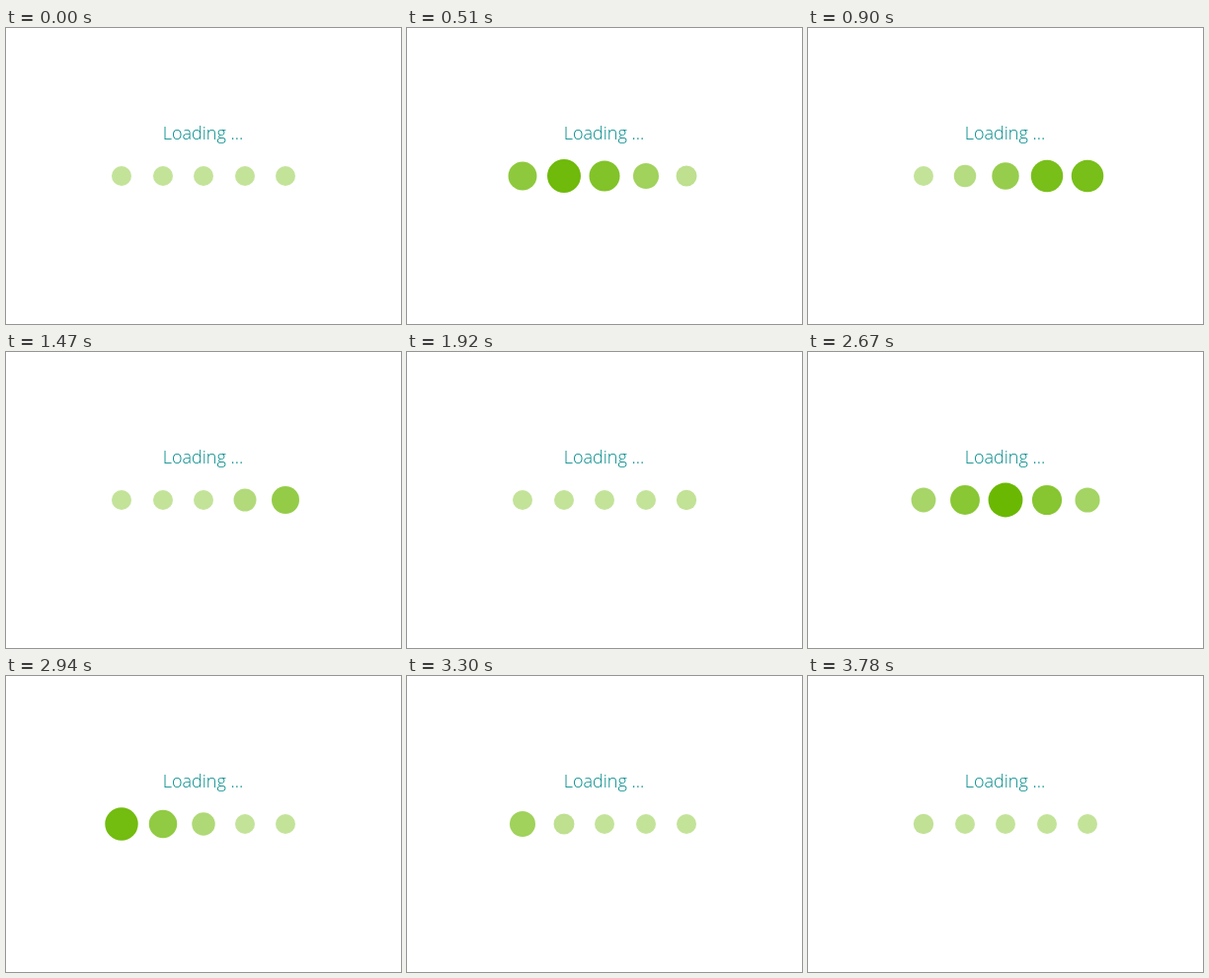
These frames come from a looping animation (400 by 300 pixels, 3.81 s). An HTML page:

```html
<!DOCTYPE html>
<html lang="en">
<head>
<meta charset="utf-8">
<title>Loading</title>
<style>
  /* Position of the wave, counted in dots */
  @property --wave {
    syntax: "<number>";
    inherits: true;
    initial-value: -2;
  }
  html, body {
    margin: 0;
    width: 100%;
    height: 100%;
    overflow: hidden;
    background: #fff;
  }
  svg {
    display: block;
    width: 400px;
    height: 300px;
    animation: sweep 3810ms linear infinite;
  }
  text {
    font: 300 18px "Open Sans", sans-serif;
    fill: #008b8b;
    text-anchor: middle;
  }
  circle {
    --gap: max(var(--wave) - var(--i), var(--i) - var(--wave));
    --near: max(0, 1 - var(--gap) / 3);
    cy: 150px;
    r: calc(10px + 7.5px * var(--near));
    fill: #6ab800;
    opacity: calc(0.4 + 0.6 * var(--near));
  }
  @keyframes sweep {
    0% { --wave: -2; }
    13.386% { --wave: 2.2; }
    23.622% { --wave: 4.5; }
    28.346% { --wave: 5.35; }
    38.583% { --wave: 6.4; }
    42.52% { --wave: 6.9; }
    50% { --wave: 8; }
    56.693% { --wave: 7; }
    60.63% { --wave: 5.9; }
    70.866% { --wave: 2.8; }
    77.165% { --wave: 0.7; }
    85.039% { --wave: -0.65; }
    100% { --wave: -2; }
  }
</style>
</head>
<body>
<svg viewBox="0 0 400 300">
  <text x="199.5" y="113">Loading ...</text>
  <circle cx="117" style="--i: 1"/>
  <circle cx="159" style="--i: 2"/>
  <circle cx="200" style="--i: 3"/>
  <circle cx="242" style="--i: 4"/>
  <circle cx="283" style="--i: 5"/>
</svg>
</body>
</html>
```
